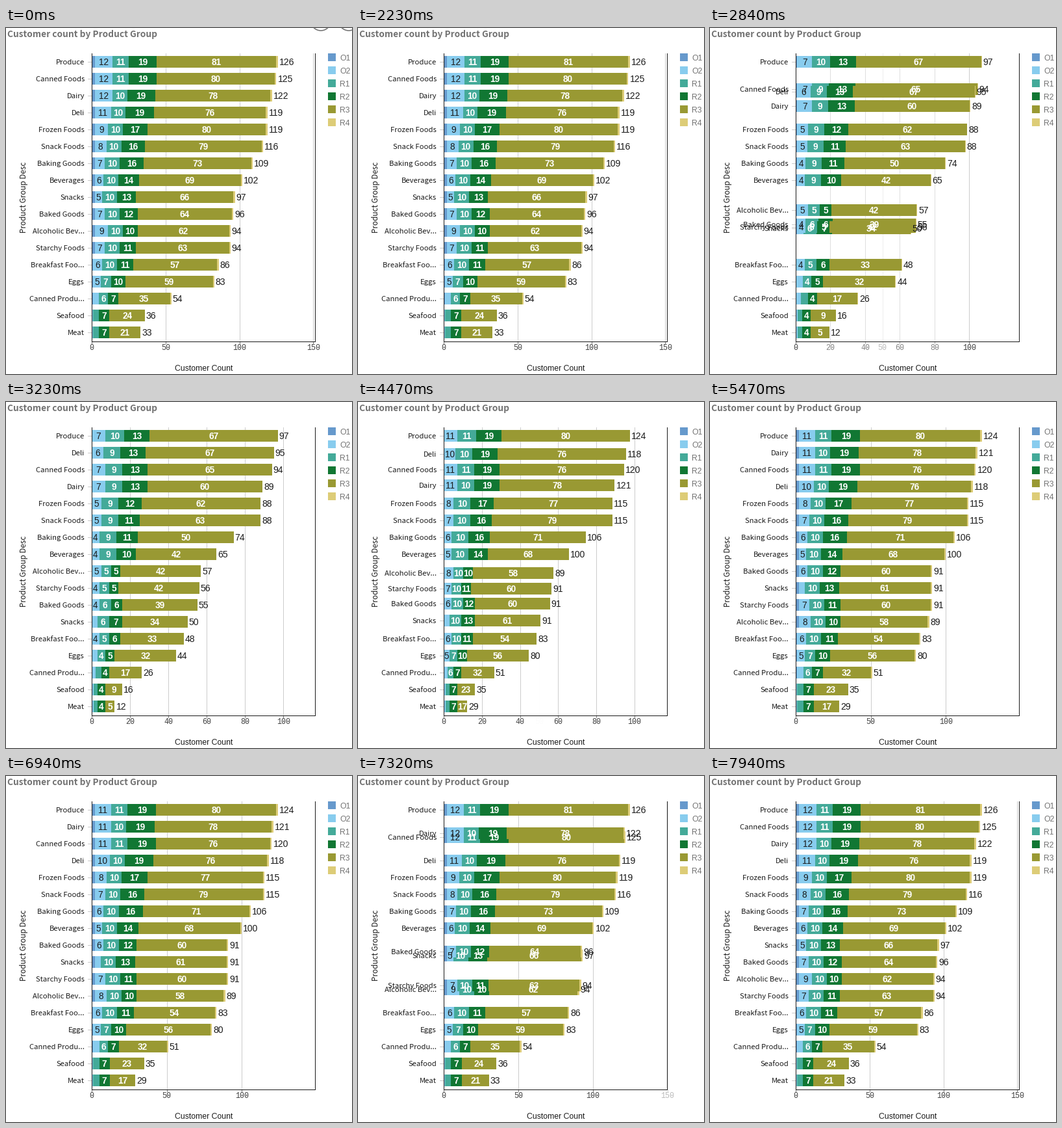
A matplotlib script for the animation above (8 s loop, 533 px wide and 532 px high).

```python
import matplotlib.pyplot as plt
import numpy as np
from matplotlib.animation import FuncAnimation
from matplotlib.patches import Circle, Rectangle
from matplotlib.transforms import Bbox

W, H, DPI = 533, 532, 64
INTERVAL, FRAMES = 80, 100
LEFT, RIGHT, TOP, BOTTOM = 132, 476, 39, 482
ROW_TOP, ROW_STEP, BAR_H = 52, 26, 18
UI_FONT = "Noto Sans CJK JP"
INK, GREY = "#1a1a1a", "#737373"

SERIES = {"O1": "#6699cc", "O2": "#88ccee", "R1": "#44aa99",
          "R2": "#117733", "R3": "#999933", "R4": "#ddcc77"}
LABEL_COLORS = [None, INK, "white", "white", "white", None]

# Customers per product under each of the three selections
TOTALS = {
    "Produce": (126, 97, 124), "Canned Foods": (125, 94, 120),
    "Dairy": (122, 89, 121), "Deli": (119, 95, 118),
    "Frozen Foods": (119, 88, 115), "Snack Foods": (116, 88, 115),
    "Baking Goods": (109, 74, 106), "Beverages": (102, 65, 100),
    "Snacks": (97, 50, 91), "Baked Goods": (96, 55, 91),
    "Alcoholic Bev...": (94, 57, 89), "Starchy Foods": (94, 56, 91),
    "Breakfast Foo...": (86, 48, 83), "Eggs": (83, 44, 80),
    "Canned Produ...": (54, 26, 51), "Seafood": (36, 16, 35), "Meat": (33, 12, 29)}
NAMES = list(TOTALS)
RANK = np.arange(len(NAMES))


def curve(*points):
    """Value for every rank, linear between a few key points."""
    return np.interp(RANK, *zip(*points))


def whole(x):
    return np.floor(x + 0.5).astype(int)


O1 = np.select([RANK < 12, RANK < 15], [2, 1])
O2 = curve((2, 12), (4, 9), (8, 5), (10, 9), (11, 7), (14, 4), (15, 1))
R1 = curve((0, 10.6), (9, 10), (12, 9.5), (13, 7), (15, 4))
R2 = curve((3, 18.6), (4, 17), (6, 15.8), (10, 10.4), (12, 11), (13, 10), (14, 7))
POPULAR = RANK < 8


class State:
    """Layout of the settled chart for one selection."""

    def __init__(self, column, tick_step, o1, o2, r1, r2, r4):
        self.totals = np.array([t[column] for t in TOTALS.values()])
        parts = [whole(s) for s in (o1, o2, r1, r2)]
        last = r4 * (self.totals > 50)
        self.values = np.stack(parts + [self.totals - sum(parts) - last, last], axis=1)
        self.axis_max = 1.2 * self.totals.max()
        self.ticks = set(range(0, int(self.axis_max) + 1, tick_step))
        order = sorted(RANK, key=lambda i: (-self.totals[i], NAMES[i]))
        self.rows = np.empty(len(NAMES))
        self.rows[order] = ROW_TOP + ROW_STEP * RANK
        self.labelled = self.values * (RIGHT - LEFT) / self.axis_max > 11


FULL = State(0, 50, O1, O2, R1, R2, 1)
FEW = State(1, 20, 0 * O1, 0.6 * O2, R1 * np.where(POPULAR, 0.9, 0.55),
            R2 * np.where(POPULAR, 0.7, 0.5), 0)
MOST = State(2, 50, O1, O2 - (RANK < 11), R1, R2, 1)

# (from, to, start, duration, first visible change), times in ms
TRANSITIONS = [(FULL, FEW, 2290, 1070, 2380),
               (FEW, MOST, 4212, 1200, 4470),
               (MOST, FULL, 6846, 1100, 7090)]


def ease(u, power):
    u = min(max(u, 0), 1)
    half = 0.5 * (2 * min(u, 1 - u)) ** power
    return half if u < 0.5 else 1 - half


def phase(t):
    """Old state, new state and linear progress at time t."""
    old, new, u = FULL, FULL, 1
    for a, b, start, duration, visible in TRANSITIONS:
        if t >= visible:
            old, new, u = a, b, (t - start) / duration
    return old, new, u


fig = plt.figure(figsize=(W / DPI, H / DPI), dpi=DPI, facecolor="white")
ax = fig.add_axes([0, 0, 1, 1])
ax.set(xlim=(0, W), ylim=(H, 0))
ax.axis("off")


def text(x, y, s, px, font="Liberation Sans", color=INK, **kw):
    return ax.text(x, y, s, fontsize=px * 72 / DPI, family=font, color=color, **kw)


def box(x, y, w, h, color, z=1):
    return ax.add_patch(Rectangle((x, y), w, h, fc=color, lw=0, zorder=z))


text(2, 14, "Customer count by Product Group", 13.7, UI_FONT, GREY, weight="bold")
text(305, 527, "Customer Count", 12.2, ha="center")
text(31, 260, "Product Group Desc", 11.7, UI_FONT, ha="center",
     rotation=90, rotation_mode="anchor")
for k, (name, color) in enumerate(SERIES.items()):
    box(496, 39 + 20 * k, 12, 12, color)
    text(514, 50 + 20 * k, name, 12.2, color=GREY)

for x in (LEFT, RIGHT):
    box(x, TOP, 1, BOTTOM - TOP + 1, INK, 4)
box(LEFT, BOTTOM, RIGHT - LEFT + 1, 1, INK, 4)

icons = [ax.add_patch(Circle((x, -11.5), 15.5, fill=False, ec=GREY, lw=1.8))
         for x in (485, 528)]

ticks = {v: (box(0, TOP, 1, BOTTOM - TOP, "#cccccc"),
             box(0, BOTTOM, 1, 4, "#808080"),
             text(0, 495, str(v), 11.6, "Liberation Mono", "#404040", ha="center"))
         for v in sorted(FULL.ticks | FEW.ticks | MOST.ticks)}


def make_label(color):
    weight = "bold" if color == "white" else "normal"
    return color and text(0, 0, "", 13.6, color=color, ha="center", zorder=5,
                          weight=weight, clip_on=True)


rows = [dict(name=text(121, 0, name, 11.3, UI_FONT, ha="right", zorder=5),
             mark=box(126, 0, 6, 1, "#cccccc"),
             bars=[box(0, 0, 0, BAR_H, c, 3) for c in SERIES.values()],
             labels=[make_label(c) for c in LABEL_COLORS],
             total=text(0, 0, "", 14, zorder=5))
        for name in NAMES]


def draw_ticks(old, new, p, scale):
    for v, artists in ticks.items():
        x = LEFT + v * scale
        alpha = (1 - p) * (v in old.ticks) + p * (v in new.ticks)
        line, mark, label = artists
        for artist in artists:
            artist.set_alpha(alpha)
            artist.set_visible(alpha > 0.01 and x < RIGHT + 4)
        line.set_x(round(x))
        mark.set_x(round(x))
        label.set_x(x)


def draw_row(i, row, new, y, values, scale):
    row["name"].set_y(y + 4)
    row["mark"].set_y(round(y))
    edges = LEFT + scale * np.concatenate([[0], np.cumsum(values)])
    for k, (bar, label) in enumerate(zip(row["bars"], row["labels"])):
        x0, x1 = edges[k], edges[k + 1]
        bar.set_bounds(x0, y - BAR_H / 2, x1 - x0, BAR_H)
        if label:
            label.set_visible(bool(new.labelled[i, k]))
            label.set_text(str(new.values[i, k]))
            label.set_position(((x0 + x1) / 2, y + 5))
            label.set_clip_box(Bbox.from_extents(x0, H - y - 9, x1, H - y + 9))
    row["total"].set_text(str(new.totals[i]))
    row["total"].set_position((edges[-1] + 2, y + 5))


def update(n):
    old, new, u = phase(n * INTERVAL + 70)
    move, stretch = ease(u, 3), ease(u, 4)
    for icon in icons:
        icon.set_visible(n == 0)
    axis_max = old.axis_max + stretch * (new.axis_max - old.axis_max)
    scale = (RIGHT - LEFT) / axis_max
    values = old.values + stretch * (new.values - old.values)
    ys = old.rows + move * (new.rows - old.rows)
    draw_ticks(old, new, stretch, scale)
    for i, row in enumerate(rows):
        draw_row(i, row, new, ys[i], values[i], scale)
    return []


anim = FuncAnimation(fig, update, frames=FRAMES, interval=INTERVAL,
                     repeat=True, repeat_delay=0, blit=False)
plt.show()
```
